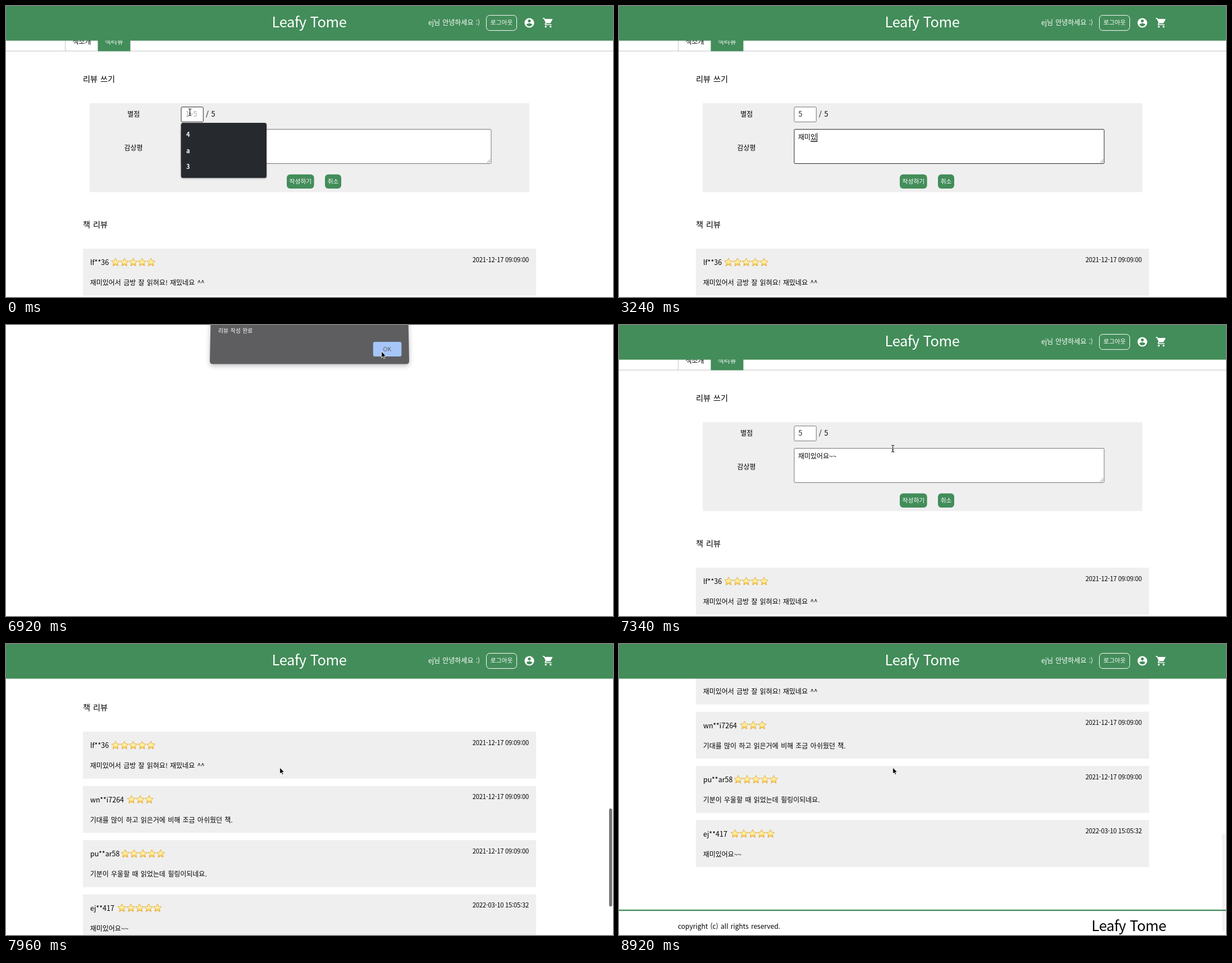
Animation, 1081 px wide and 518 px high, one loop 9 s. Source, as an HTML page:

```html
<!DOCTYPE html>
<html lang="ko">
<head>
<meta charset="utf-8">
<title>Review</title>
<style>
html, body { margin: 0; width: 100%; height: 100%; overflow: hidden; background: #fff; }
svg { display: block; width: 1081px; height: 518px; }
text { font: 12px "Noto Sans CJK KR", "Noto Sans", sans-serif; word-spacing: .9px; white-space: pre; }
.head { font-size: 14.2px; }
.btn { font-size: 10.75px; font-weight: 500; fill: #fff; text-anchor: middle; }
.logo { font-size: 25.5px; letter-spacing: -.4px; text-anchor: middle; word-spacing: 0; }
.name { font-size: 12.5px; }
.date { font-size: 11.2px; letter-spacing: -.2px; text-anchor: end; word-spacing: 0; }
.mid { text-anchor: middle; }
</style>
</head>
<body>
<svg viewBox="0 0 1081 518" xmlns="http://www.w3.org/2000/svg">
  <defs>
    <linearGradient id="gold" x1="0" y1="0" x2="0" y2="1">
      <stop offset="0" stop-color="#fde68a"/>
      <stop offset=".5" stop-color="#fff3a6"/>
      <stop offset="1" stop-color="#f3b72f"/>
    </linearGradient>
    <filter id="soft" x="-20%" y="-30%" width="140%" height="170%">
      <feDropShadow dx="0" dy="3" stdDeviation="5" flood-opacity=".35"/>
    </filter>
    <filter id="thin" x="-10%" y="-10%" width="120%" height="125%">
      <feDropShadow dx="0" dy="1" stdDeviation="1.5" flood-opacity=".35"/>
    </filter>
  </defs>

  <g id="site">
    <g id="page">
      <path d="M0 80.2H1081M105.5 40V80" stroke="#c4c4c4"/>
      <rect x="163.5" y="40" width="58" height="40.5" fill="#438d5a"/>
      <text class="mid" x="135" y="68">책소개</text>
      <text class="mid" x="192.3" y="68" fill="#fff">책리뷰</text>
      <text class="head" x="137" y="135.3">리뷰 쓰기</text>

      <rect x="149" y="173" width="783" height="158.3" fill="#efefef"/>
      <text class="mid" x="227.3" y="196.7">별점</text>
      <text class="mid" x="227" y="256.8">감상평</text>
      <rect id="score" x="312" y="179.8" width="39.3" height="26.5" rx="1.8" fill="#fff"/>
      <text id="scoreText" x="319.5" y="197" style="font-size:12.6px"></text>
      <text x="356" y="197" style="font-size:12.6px">/ 5</text>
      <rect id="area" x="312" y="219.5" width="552" height="61" rx="1.8" fill="#fff"/>
      <path d="M856.8 279L862.6 273.2M860 279L862.6 276.4" stroke="#777" stroke-width=".9"/>
      <text id="typed" x="319" y="238.2"></text>
      <rect id="under" y="240.2" width="10.6" height="1.4"/>
      <rect id="caret" width="1" height="16"/>
      <rect x="500" y="299.8" width="48.6" height="25.3" rx="6" fill="#438d5a"/>
      <rect x="568" y="299.8" width="29" height="25.3" rx="6" fill="#438d5a"/>
      <text class="btn" x="524.4" y="315.6">작성하기</text>
      <text class="btn" x="582.6" y="315.6">취소</text>

      <text class="head" x="137" y="393.8">책 리뷰</text>
      <g id="reviews"></g>
      <rect y="880.8" width="1081" height="2.4" fill="#438d5a"/>
      <text x="105" y="914.8" font-style="italic">copyright (c) all rights reserved.</text>
      <text class="logo" x="908" y="918.5">Leafy Tome</text>

      <g id="popup" filter="url(#thin)" fill="#fff" font-weight="bold">
        <rect x="311.7" y="208" width="152.3" height="98" rx="3.5" fill="#282b2e"/>
      </g>
    </g>

    <rect width="1081" height="61.7" fill="#438d5a"/>
    <g fill="#fff">
      <text class="logo" x="540" y="37.5">Leafy Tome</text>
      <text x="752" y="34">ej님 안녕하세요 :)</text>
      <rect x="855.5" y="16.6" width="54" height="27" rx="6" fill="none" stroke="#fff"/>
      <text class="btn" x="882.6" y="33.3">로그아웃</text>
      <g transform="translate(921.7 19.7) scale(.86)">
        <circle cx="12" cy="12" r="10"/>
        <g fill="#438d5a">
          <circle cx="12" cy="8" r="3"/>
          <path d="M12 19.2c-2.5 0-4.7-1.3-6-3.2 0-2 4-3.1 6-3.1s6 1.100 6 3.100c-1.300 1.900-3.500 3.200-6 3.200z"/>
        </g>
      </g>
      <g transform="translate(955.2 19.500) scale(.86)">
        <path d="M1 2V4H3L6.600 11.600 5.250 14A2 2 0 0 0 7 17H19V15H7.400Q7 15 7.200 14.600L8.100 13H15.550Q16.800 13 17.300 12L20.900 5.500Q21.500 4 20 4H5.200L4.270 2Z"/>
        <circle cx="7" cy="20" r="2"/><circle cx="17" cy="20" r="2"/>
      </g>
    </g>
    <rect id="thumb" x="1074" width="5.500" height="174.500" rx="2.700" fill="#767676"/>
  </g>

  <g id="dialog">
    <path d="M364.800 -20L363 64Q363 69.500 368 69.500H713Q718 69.500 718 64L716.200 -20Z" fill="#292a2d" filter="url(#soft)"/>
    <text x="378" y="13.500" fill="#fff" style="font-size:9.8px;font-weight:500">리뷰 작성 완료</text>
    <rect x="653.800" y="30" width="50.500" height="26" rx="3" fill="#8ab4f8"/>
    <text class="mid" x="678.700" y="46.500" fill="#292a2d" style="font-size:10.500px">OK</text>
  </g>

  <g id="ring" fill="none">
    <circle cx="515.300" cy="310" r="23.300" stroke="#fff" stroke-width="4" opacity=".5"/>
    <circle cx="515.300" cy="310" r="23.300" stroke="#000" stroke-width="2.200"/>
  </g>

  <g id="mouse">
    <path id="arrow" d="M0 0V11.300L2.600 8.900 4.300 12.800 6.200 12 4.500 8.200H8Z" fill="#000" stroke="#fff" stroke-width=".9"/>
    <g id="beam" fill="none">
      <path d="M-2.700 -6Q0 -6 0 -4.500Q0 -6 2.700 -6M0 -5V5M-2.700 6Q0 6 0 4.500Q0 6 2.700 6M-1.500 2H1.500" stroke="#fff" stroke-width="2.200"/>
      <path d="M-2.700 -6Q0 -6 0 -4.500Q0 -6 2.700 -6M0 -5V5M-2.700 6Q0 6 0 4.500Q0 6 2.700 6M-1.500 2H1.500" stroke="#111" stroke-width="1.100"/>
    </g>
    <path id="hand" d="M-1.300 6.500V.8Q0 -.9 1.200 .8V4.500Q2.500 3.600 3.400 5Q4.700 4.300 5.300 5.600Q7 5.300 7 7V9.500Q7 11 5.800 12.200V13.500H-.2V12.500Q-2 10.500 -3.600 7.800Q-3.300 6 -1.300 7.500Z" fill="#fff" stroke="#000" stroke-width="1"/>
  </g>
</svg>

<script>
const LOOP = 9000;
const $ = id => document.getElementById(id);
const set = (id, attrs) => { for (const k in attrs) $(id).setAttribute(k, attrs[k]); };
const show = (id, on) => set(id, { visibility: on ? 'visible' : 'hidden' });
const ramp = (t, a, b) => Math.min(1, Math.max(0, (t - a) / (b - a)));
const smooth = u => u * u * (3 - 2 * u);
const within = (t, a, b) => t >= a && t < b;

// name, stars, stars' left edge, date, text
const REVIEWS = [
  ['lf**36', 5, 187, '2021-12-17 09:09:00', '재미있어서 금방 잘 읽혀요! 재밌네요 ^^'],
  ['wn**i7264', 3, 215.3, '2021-12-17 09:09:00', '기대를 많이 하고 읽은거에 비해 조금 아쉬웠던 책.'],
  ['pu**ar58', 5, 204.3, '2021-12-17 09:09:00', '기분이 우울할 때 읽었는데 힐링이되네요.'],
  ['ej**417', 5, 198.5, '2022-03-10 15:05:32', '재미있어요~~']
];

// time, text, whether the last syllable is being composed
const TYPING = [
  [0, '', 0], [2140, 'ㅈ', 1], [2200, '자', 1], [2260, '재', 1],
  [2560, '재ㅁ', 1], [2740, '재미', 1], [2800, '재미ㅇ', 1], [2840, '재미이', 1],
  [3240, '재미있', 1], [3400, '재미있ㅇ', 1], [3500, '재미있어', 1],
  [3660, '재미있어ㅇ', 1], [4020, '재미있어요', 1],
  [4120, '재미있어요~', 0], [4280, '재미있어요~~', 0]
];

// time, x, y
const PATH = [
  [4980, 327.5, 189], [5460, 515, 310], [6440, 515, 310],
  [6860, 668.7, 47], [7200, 668.7, 47], [7340, 487.7, 220]
];

// time, offset, speed per ms
const SCROLL = [[7620, 0, .9], [7820, 175, .74], [8220, 390, .13], [8480, 408, 0]];

function star(cx, cy) {
  const pts = Array.from({ length: 10 }, (_, i) => {
    const r = i % 2 ? 3.7 : 7.7, a = i * Math.PI / 5;
    return (cx + r * Math.sin(a)).toFixed(1) + ',' + (cy - r * Math.cos(a)).toFixed(1);
  });
  return `<polygon points="${pts.join(' ')}" fill="url(#gold)" stroke="#dfa02c" stroke-width=".8" stroke-linejoin="round"/>`;
}

$('reviews').innerHTML = REVIEWS.map(([name, n, x, date, body], i) => {
  const stars = Array.from({ length: n }, (_, k) => star(x + 8 + k * 15.8, 24.5)).join('');
  return `<g transform="translate(0 ${432 + i * 96.5})">
    <rect x="137" width="807" height="83.6" fill="#efefef"/>
    <text class="name" x="150" y="29.3">${name}</text>${stars}
    <text class="date" x="931" y="23.6">${date}</text>
    <text x="149.7" y="65">${body}</text></g>`;
}).join('');

$('popup').innerHTML += ['4', 'a', '3'].map((s, i) =>
  `<text x="321" y="${233 + i * 28.5}" style="font-size:11px;font-weight:700">${s}</text>`).join('');

function mouseAt(t) {
  let i = 0;
  while (i < PATH.length - 2 && t >= PATH[i + 1][0]) i++;
  const [a, x, y] = PATH[i], [b, x2, y2] = PATH[i + 1];
  const u = smooth(ramp(t, a, b));
  return [x + (x2 - x) * u, y + (y2 - y) * u];
}

function scrollAt(t) {
  if (t <= SCROLL[0][0]) return 0;
  for (let i = 0; i < SCROLL.length - 1; i++) {
    const [a, p, m] = SCROLL[i], [b, q, n] = SCROLL[i + 1];
    if (t > b) continue;
    const u = (t - a) / (b - a), v = 1 - u, d = b - a;
    return v * v * (1 + 2 * u) * p + u * u * (3 - 2 * u) * q + u * v * d * (v * m - u * n);
  }
  return 408;
}

function cursorKind(t, x, y) {
  if (t < 340 || within(t, 7300, 7900)) return 'beam';
  if (!within(t, 4980, 5980)) return 'arrow';
  if (x > 500 && y > 300) return 'hand';
  return y < 206 || within(y, 220, 281) ? 'beam' : 'arrow';
}

function border(id, focus) {
  const c = Math.round(118 - 78 * focus);
  set(id, { stroke: `rgb(${c},${c},${c})` });
}

function drawForm(t) {
  set('popup', { opacity: 1 - ramp(t, 20, 140) });
  $('scoreText').textContent = t < 20 ? '1~5' : '5';
  set('scoreText', { fill: t < 20 ? '#a6a6a6' : '#222' });

  const shift = ramp(t, 520, 640);
  border('score', 1 - shift);
  border('area', t < 5460 ? shift : 0);

  const [, text, composing] = TYPING.filter(s => t >= s[0]).pop();
  const typed = $('typed');
  if (typed.textContent !== text) typed.textContent = text;
  const end = 319 + (text ? typed.getComputedTextLength() : 0);
  set('under', { x: end - 10.9 });
  show('under', composing);

  const inScore = within(t, 160, 520);
  set('caret', inScore ? { x: 327, y: 185 } : { x: end, y: 226 });
  show('caret', inScore || within(t, 640, 1540) || within(t, 2140, 4800));
}

function render(t) {
  show('site', true);
  $('site').style.display = within(t, 5980, 7040) ? 'none' : '';
  drawForm(t);

  const top = scrollAt(t);
  set('page', { transform: `translate(0 ${-top.toFixed(2)})` });
  set('thumb', {
    y: 199 + top * .3395,
    opacity: t < 7620 ? 0 : 1 - .9 * ramp(t, 8820, 8920)
  });

  const open = smooth(ramp(t, 5980, 6180));
  const scale = .94 + .06 * open;
  set('dialog', {
    opacity: open * (1 - ramp(t, 6885, 7031)),
    transform: `translate(540.5 0) scale(${scale}) translate(-540.5 0)`
  });

  set('ring', { opacity: t < 5600 ? 0 : 1 - ramp(t, 5680, 5780) });

  const [x, y] = mouseAt(t);
  const kind = cursorKind(t, x, y);
  set('mouse', { transform: `translate(${x.toFixed(2)} ${y.toFixed(2)})` });
  const seen = t < 340 || t >= 4980;
  for (const k of ['arrow', 'beam', 'hand']) show(k, seen && k === kind);
}

function tick() {
  render(performance.now() % LOOP);
  requestAnimationFrame(tick);
}
tick();
</script>
</body>
</html>
```
